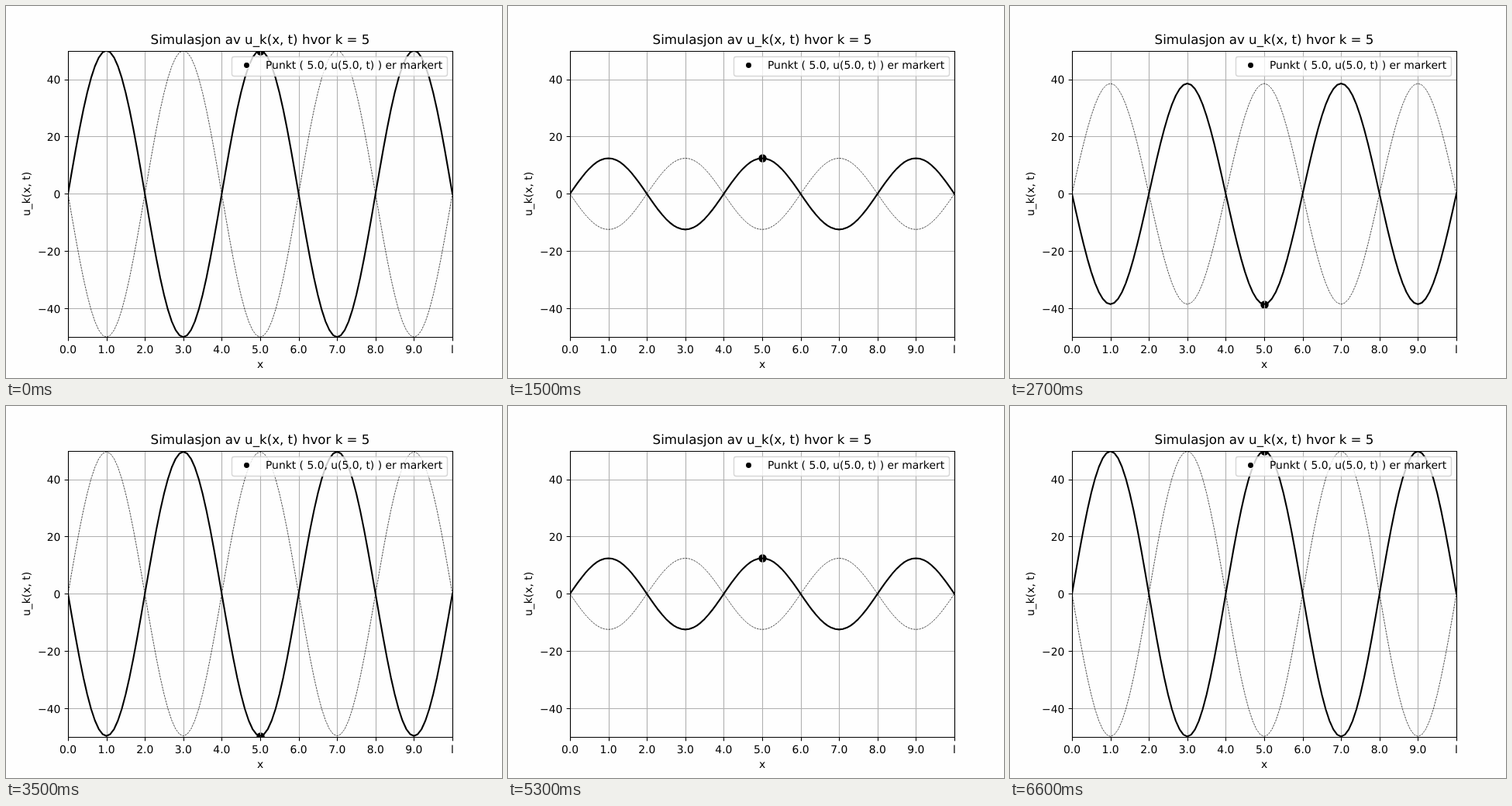
An HTML page for the animation above (6.7 s loop, 640x480 px).

```html
<!DOCTYPE html>
<html lang="no">
<head>
<meta charset="utf-8">
<title>Stående bølge</title>
<style>
  html, body { margin: 0; width: 100%; height: 100%; overflow: hidden; background: #fefefe; }
  svg { display: block; }
  text { font: 13.889px "DejaVu Sans", sans-serif; text-rendering: geometricPrecision; }
  .title { font-size: 16.667px; }
  .mid { text-anchor: middle; }
  .end { text-anchor: end; }
  path { fill: none; stroke: #000; stroke-width: 1.111; }
  #grid { stroke: #b0b0b0; }
  #wave { stroke-width: 2.083; stroke-linejoin: round; stroke-linecap: square; }
  #mirror { stroke-width: .694; stroke-linejoin: round; stroke-dasharray: 2.57 1.11; }
  #frame { stroke-linecap: square; }
</style>
</head>
<body>
<svg width="640" height="480" viewBox="0 0 640 480">
  <clipPath id="plot"><rect x="80" y="58" width="496" height="369"/></clipPath>
  <g clip-path="url(#plot)">
    <circle id="dot" r="5.2"/>
    <path id="grid"/>
    <path id="wave"/>
    <path id="mirror"/>
  </g>
  <path id="ticks"/>
  <path id="frame" d="M80.5 58.5H576.5V427.5H80.5Z"/>
  <g id="labels"></g>
  <rect x="291.5" y="65.5" width="278" height="25" rx="2.78" fill="#fff" fill-opacity=".8"
        stroke="#ccc" stroke-opacity=".8" stroke-width="1.389"/>
  <path d="M296.5 76.5H324.3" style="stroke:#fff;stroke-width:2.083"/>
  <circle cx="310.5" cy="76.5" r="4.167" stroke="#fff" stroke-width="1.389"/>
  <text x="335" y="81">Punkt ( 5.0, u(5.0, t) ) er markert</text>
</svg>
<script>
const $ = id => document.getElementById(id);
const LEFT = 80, RIGHT = 576, TOP = 57.6, BOTTOM = 427.2;
const PEAK = 50, STEP_MS = 100, LOOP_MS = 6700, LAST_STEP = 33, TICK = 4.86;

const px = x => LEFT + x * (RIGHT - LEFT) / 10;
const py = u => (TOP + BOTTOM) / 2 - u * (BOTTOM - TOP) / (2 * PEAK);
const snap = v => Math.floor(v + .5) + .5;

function label(text, x, y, cls, turn) {
  const el = document.createElementNS("http://www.w3.org/2000/svg", "text");
  el.textContent = text;
  el.setAttribute("class", cls);
  el.setAttribute("transform", `translate(${x} ${y}) rotate(${turn || 0})`);
  $("labels").append(el);
}

function drawAxes() {
  let grid = "", ticks = "";
  for (let x = 0; x <= 10; x++) {
    const at = snap(px(x));
    grid += `M${at} 58V428`;
    ticks += `M${at} 427.5v${TICK}`;
    label(x < 10 ? x.toFixed(1) : "l", px(x), 448, "mid");
  }
  for (let u = -40; u <= 40; u += 20) {
    const at = snap(py(u));
    grid += `M80 ${at}H577`;
    ticks += `M80.5 ${at}h${-TICK}`;
    label(String(u).replace("-", "\u2212"), 70.3, Math.round(py(u) + 5.27), "end");
  }
  $("grid").setAttribute("d", grid);
  $("ticks").setAttribute("d", ticks);
  label("Simulasjon av u_k(x, t) hvor k = 5", 328, 49, "mid title");
  label("x", 328, 467, "mid");
  label("u_k(x, t)", 31, 242.4, "mid", -90);
}

function curve(amp) {
  const points = [];
  for (let i = 0; i <= 100; i++) {
    const x = i / 10;
    points.push(px(x).toFixed(2) + " " + py(amp * Math.sin(Math.PI * x / 2)).toFixed(3));
  }
  return "M" + points.join("L");
}

// The swing runs forward to LAST_STEP and then back again.
function amplitude(ms) {
  const step = Math.max(0, Math.floor(ms / STEP_MS) - 1);
  const phase = step > LAST_STEP ? 2 * LAST_STEP - step : step;
  return PEAK * Math.cos(.03 * Math.PI * phase);
}

function render(ms) {
  const amp = amplitude(ms);
  $("wave").setAttribute("d", curve(amp));
  $("mirror").setAttribute("d", curve(-amp));
  $("dot").setAttribute("cx", snap(px(5)));
  $("dot").setAttribute("cy", snap(py(amp)));
}

drawAxes();
render(0);
const start = performance.now();
(function tick() {
  render((performance.now() - start) % LOOP_MS);
  requestAnimationFrame(tick);
})();
</script>
</body>
</html>
```
